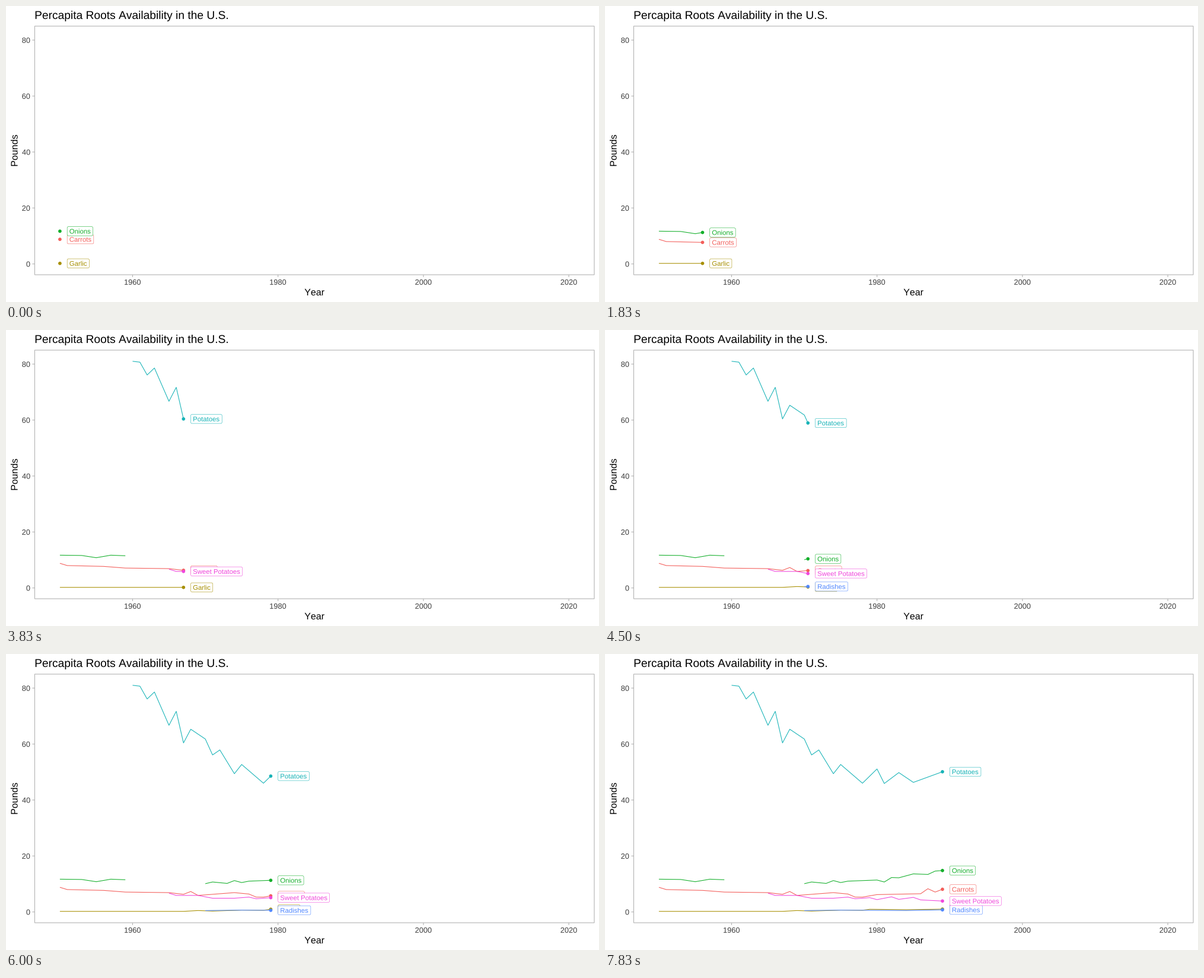
A matplotlib script that plays this animation: 1000x500 px, repeating every 8000 ms.

```python
import matplotlib.pyplot as plt
import numpy as np
from matplotlib.animation import FuncAnimation
from matplotlib.patches import Circle, FancyBboxPatch, PathPatch, Rectangle
from matplotlib.textpath import TextPath
from matplotlib.transforms import Affine2D

plt.rcParams.update({"font.family": "Liberation Sans", "text.kerning_factor": 6})

WIDTH, HEIGHT, DPI = 1000, 500, 100
PT = 72 / DPI  # points per pixel
LOOP_MS, STEP_MS = 8000, 40
FIRST, LAST, REVEAL_STEPS = 1950, 2019, 74
STEPS_PER_S, HOLD = 6, 5

LEFT, RIGHT, TOP, BOTTOM = 48.4, 992, 34, 454
GREY, TICK_TEXT = "#b0b0b0", "#3c3c3c"
LINE = 1.07 * PT
GREEN = "#14af2b"

# name, colour, turning points as (year, pounds)
SERIES = [
    ("Carrots", "#f35e5a", [
        (1950, 8.8), (1951, 8), (1956, 7.7), (1959, 7.1), (1965, 6.9), (1967, 6.3),
        (1968, 7.3), (1969, 5.9), (1974, 6.9), (1976, 6.4), (1977, 5.3), (1978, 5.3),
        (1980, 6.2), (1986, 6.5), (1987, 8.3), (1988, 7.1), (1989, 8.1)]),
    ("Garlic", "#a78f00", [
        (1950, 0.2), (1967, 0.2), (1969, 0.5), (1971, 0.3), (1975, 0.65),
        (1978, 0.6), (1979, 0.95), (1984, 0.8), (1989, 1)]),
    ("Onions", GREEN, [
        (1950, 11.7), (1953, 11.6), (1955, 10.8), (1957, 11.7), (1959, 11.5)]),
    ("Onions", GREEN, [
        (1970, 10.1), (1971, 10.7), (1973, 10.2), (1974, 11.2), (1975, 10.5),
        (1976, 11), (1980, 11.4), (1981, 10.7), (1982, 12.3), (1983, 12.2),
        (1985, 13.6), (1987, 13.4), (1988, 14.6), (1989, 14.8)]),
    ("Potatoes", "#17b3b7", [
        (1960, 81), (1961, 80.7), (1962, 76.1), (1963, 78.6), (1965, 66.7),
        (1966, 71.7), (1967, 60.4), (1968, 65.3), (1970, 61.8), (1971, 56.1),
        (1972, 57.9), (1974, 49.4), (1975, 52.7), (1978, 46), (1980, 51.1),
        (1981, 45.9), (1983, 49.8), (1985, 46.3), (1989, 50.1)]),
    ("Radishes", "#5188ff", [
        (1970, 0.5), (1975, 0.65), (1984, 0.5), (1989, 0.75)]),
    ("Sweet Potatoes", "#f047dc", [
        (1965, 6.7), (1966, 5.9), (1969, 5.9), (1971, 4.9), (1974, 4.9),
        (1976, 5.3), (1977, 4.7), (1979, 5.1), (1980, 4.4), (1982, 5.4),
        (1983, 4.5), (1985, 5.2), (1986, 4.3), (1989, 3.9)]),
]


def px(year):
    return 90.9 + 12.26 * (year - FIRST)


def py(pounds):
    return 435.7 - 4.7265 * pounds


fig = plt.figure(figsize=(WIDTH / DPI, HEIGHT / DPI), dpi=DPI, facecolor="white")
ax = fig.add_axes([0, 0, 1, 1])
ax.set(xlim=(0, WIDTH), ylim=(HEIGHT, 0))
ax.axis("off")


def write(x, y, text, size, color="black", anchor=0.0, angle=0, **kw):
    """Draw text as outlines, so it can sit between pixels; return its width."""
    path = TextPath((0, 0), text, size=size)
    ink = path.get_extents()
    width = ink.x0 + ink.x1
    place = (Affine2D().translate(-anchor * width, 0).rotate_deg(angle)
             .scale(1, -1).translate(x, y))
    ax.add_patch(PathPatch(path.transformed(place), fc=color, lw=0, **kw))
    return width


def tick(xs, ys):
    ax.plot(xs, ys, color=GREY, lw=LINE, solid_capstyle="butt", snap=False)


def draw_axes():
    ax.add_patch(Rectangle((LEFT, TOP), RIGHT - LEFT, BOTTOM - TOP, fill=False,
                           ec=GREY, lw=LINE, zorder=5, snap=False))
    for year in range(1960, 2021, 20):
        tick([px(year)] * 2, [BOTTOM, BOTTOM + 4])
        write(px(year), 470.8, str(year), 12.8, TICK_TEXT, anchor=0.5)
    for pounds in range(0, 81, 20):
        y = py(pounds)
        tick([LEFT - 4, LEFT], [y, y])
        write(41, y + 4.7, str(pounds), 12.8, TICK_TEXT, anchor=1)
    write(LEFT - 0.3, 21.9, "Percapita Roots Availability in the U.S.", 19.2)
    write((LEFT + RIGHT) / 2, 488.8, "Year", 16, anchor=0.5)
    write(19.5, (TOP + BOTTOM) / 2, "Pounds", 16, anchor=0.5, angle=90)


class Trace:
    """A growing line with a dot and a boxed name that ride on its tip."""

    PAD, BOX_HEIGHT = 3.6, 15.4

    def __init__(self, order, name, color, points):
        self.years, self.pounds = np.array(points).T
        self.line, = ax.plot([], [], color=color, lw=LINE, zorder=1, snap=False,
                             solid_capstyle="butt", solid_joinstyle="round")
        self.shift = Affine2D()
        ride = self.shift + ax.transData
        z = 3 + order / 10
        left = px(1) - px(0)
        dot = Circle((0, 0), 2.84, fc=color, lw=0, zorder=2, transform=ride)
        width = write(left + self.PAD, 4.1, name, 11.38, color,
                      zorder=z + 0.05, transform=ride)
        box = FancyBboxPatch(
            (left, -self.BOX_HEIGHT / 2), width + 2 * self.PAD, self.BOX_HEIGHT,
            boxstyle="round,pad=0,rounding_size=2.16", fc="white", ec=color,
            lw=LINE / 2, zorder=z, snap=False, transform=ride)
        ax.add_patch(dot)
        ax.add_patch(box)
        self.tip = [dot, box, ax.patches[-3]]

    def reveal(self, year):
        end = min(year, self.years[-1])
        pounds = np.interp(end, self.years, self.pounds)
        past = self.years < end
        self.line.set_data(px(np.append(self.years[past], end)),
                           py(np.append(self.pounds[past], pounds)))
        self.shift.clear().translate(px(end), py(pounds))
        for artist in self.tip:
            artist.set_visible(self.years[0] <= year <= self.years[-1])


draw_axes()
traces = [Trace(k, *spec) for k, spec in enumerate(SERIES)]

# Each year lands on a whole step; spare steps fall midway between years.
all_years = np.arange(FIRST, LAST + 1)
year_steps = np.round((all_years - FIRST) * REVEAL_STEPS / (LAST - FIRST))


def update(n):
    beat = (n * STEP_MS + STEP_MS - 3) * STEPS_PER_S // 1000
    year = np.interp(max(beat - HOLD, 0), year_steps, all_years)
    for trace in traces:
        trace.reveal(year)
    return []


anim = FuncAnimation(fig, update, frames=LOOP_MS // STEP_MS, interval=STEP_MS,
                     init_func=lambda: update(0), repeat=True, repeat_delay=0)
plt.show()
```
